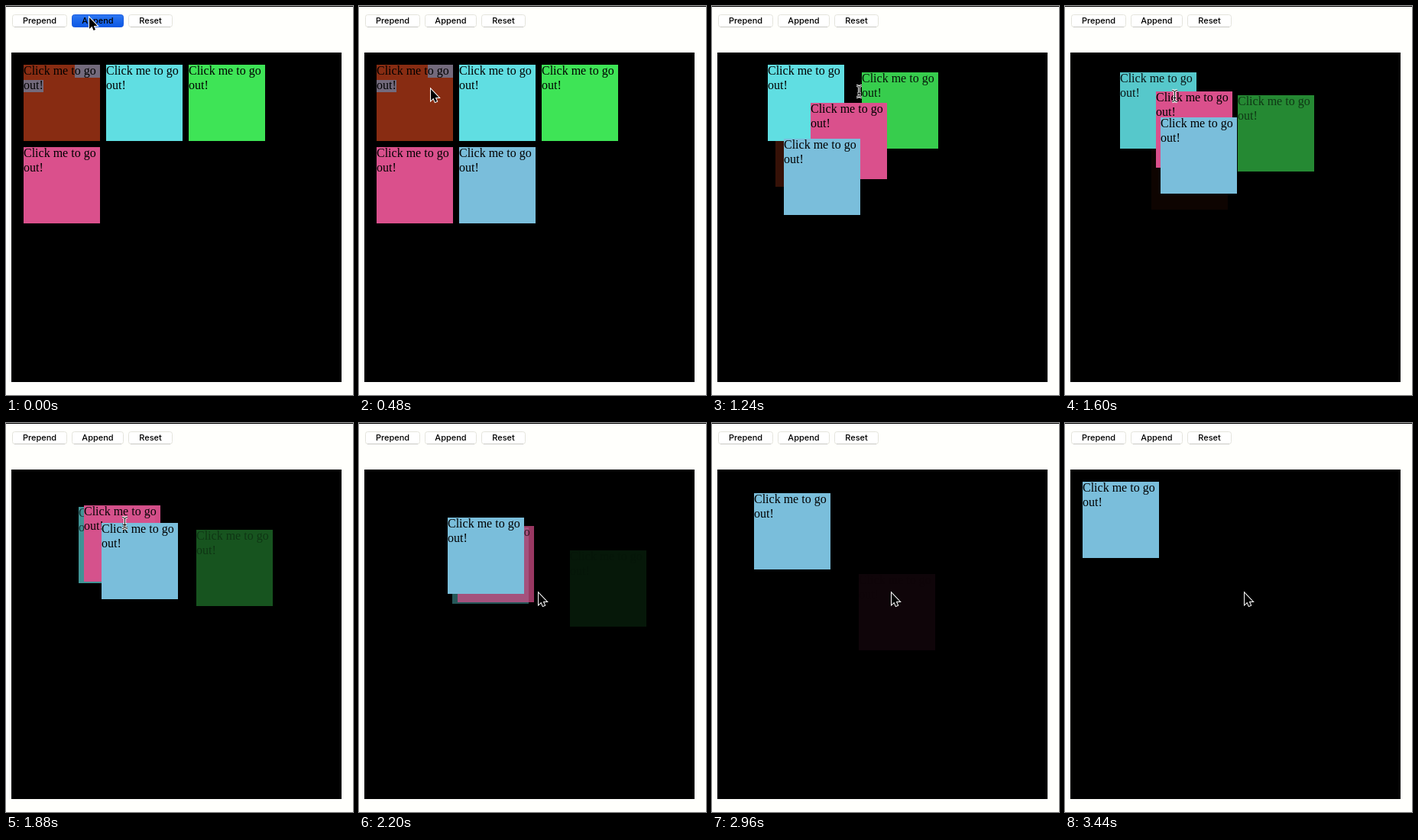
Recreate the animation shown at these times as an HTML page with a canvas. Size 454 by 510 pixels, loop 4080 ms.

```html
<!DOCTYPE html>
<html lang="en">
<head>
<meta charset="utf-8">
<title>Tile list</title>
<style>
  html, body { margin: 0; width: 100%; height: 100%; overflow: hidden; background: #fffffc; }
  canvas { display: block; }
</style>
</head>
<body>
<canvas id="stage" width="454" height="510"></canvas>
<script>
const ctx = document.getElementById('stage').getContext('2d');
const LOOP = 4080, STEP = 40, MOVE = 1200, SIZE = 100;
const COLORS = ['#882c12', '#60dee2', '#3ee456', '#da508c', '#7abedb'];
const CLICKS = [{ at: 520, tile: 0 }, { at: 1120, tile: 2 }, { at: 1480, tile: 1 }, { at: 1840, tile: 3 }];
const LAST_PATH = [[1840, 126.5, 131.5], [2200, 116, 124], [2600, 104, 115], [3200, 23, 77]];
const CURSOR_PATH = [
  [40, 109, 15], [360, 94, 109], [560, 94, 109], [840, 221, 109], [1120, 221, 109],
  [1440, 143, 118], [1840, 143, 118], [2160, 235, 223]
];

const clamp = v => Math.max(0, Math.min(1, v));
const mix = (a, b, k) => a + (b - a) * k;
const mixPoint = (a, b, k) => ({ x: mix(a.x, b.x, k), y: mix(a.y, b.y, k) });
const slot = i => ({ x: 23 + 108 * (i % 3), y: 77 + 108 * Math.floor(i / 3) });

function along(path, t) {
  let i = 1;
  while (i < path.length - 1 && t > path[i][0]) i++;
  const [t0, x0, y0] = path[i - 1], [t1, x1, y1] = path[i];
  return mixPoint({ x: x0, y: y0 }, { x: x1, y: y1 }, clamp((t - t0) / (t1 - t0)));
}

// Each removal restarts the remaining tiles from where they are now.
function tileState(id, t) {
  if (id === 4 && t < CLICKS[0].at) {
    const k = clamp((t - 30) / 370);
    return { x: 131, y: 185 + 50 * (1 - k), alpha: k };
  }
  if (id === 4 && t >= 1840) return { ...along(LAST_PATH, t), alpha: 1 };

  let from = slot(id), to = from, start = 0;
  const order = [0, 1, 2, 3, 4];
  for (const { at, tile } of CLICKS) {
    if (t < at) break;
    const now = mixPoint(from, to, clamp((at - 12 - start) / MOVE));
    if (tile === id) {
      const k = clamp((t - at) / MOVE);
      return { x: now.x + 100 * k, y: now.y + 100 * k, alpha: 1 - k };
    }
    order.splice(order.indexOf(tile), 1);
    from = now;
    to = slot(order.indexOf(id));
    start = at;
  }
  return { ...mixPoint(from, to, clamp((t - start) / MOVE)), alpha: 1 };
}

function drawTile(id, t) {
  const { x, y, alpha } = tileState(id, t);
  if (alpha <= 0) return;
  ctx.save();
  ctx.translate(Math.round(x), Math.round(y));
  ctx.globalAlpha = alpha;
  ctx.fillStyle = COLORS[id];
  ctx.fillRect(0, 0, SIZE, SIZE);
  if (id === 0 && t < CLICKS[0].at) {
    ctx.fillStyle = '#736a7c';
    ctx.fillRect(67, 0, 33, 17);
    ctx.fillRect(0, 20, 26, 16);
  }
  ctx.fillStyle = '#000';
  ctx.font = '16px "Liberation Serif", Times, serif';
  ctx.textAlign = 'left';
  ctx.fillText('Click me to go', 0, 13);
  ctx.fillText('out!', 0, 32);
  ctx.restore();
}

function drawButton(label, x, w, pressed) {
  ctx.beginPath();
  ctx.roundRect(x + 0.5, 11.5, w - 1, 16, 3);
  if (pressed) {
    const blue = ctx.createLinearGradient(0, 11, 0, 28);
    blue.addColorStop(0, '#2f78f2');
    blue.addColorStop(1, '#0a56e4');
    ctx.fillStyle = blue;
  } else {
    ctx.fillStyle = '#fff';
  }
  ctx.fill();
  ctx.lineWidth = 1;
  ctx.strokeStyle = pressed ? '#1a5ce0' : '#e4e4dc';
  ctx.stroke();
  if (!pressed) {
    ctx.fillStyle = '#c8c8c4';
    ctx.fillRect(x + 3, 27, w - 6, 1);
  }
  ctx.fillStyle = '#000';
  ctx.font = '500 11px Inter, sans-serif';
  ctx.textAlign = 'center';
  ctx.fillText(label, x + w / 2, 23);
}

function drawArrow() {
  const outline = [[0, 0], [0, 15], [3.4, 11.8], [5.6, 17], [8, 16], [5.8, 11], [10.5, 11]];
  ctx.beginPath();
  outline.forEach(([x, y]) => ctx.lineTo(x, y));
  ctx.closePath();
  ctx.lineWidth = 2;
  ctx.strokeStyle = '#fff';
  ctx.stroke();
  ctx.fillStyle = '#000';
  ctx.fill();
}

function drawBeam() {
  for (const [color, width] of [['#fff', 3], ['#000', 1]]) {
    ctx.beginPath();
    ctx.moveTo(-3, -7.5);
    ctx.quadraticCurveTo(0.5, -7.5, 0.5, -5);
    ctx.lineTo(0.5, 5);
    ctx.quadraticCurveTo(0.5, 7.5, -3, 7.5);
    ctx.moveTo(4, -7.5);
    ctx.quadraticCurveTo(0.5, -7.5, 0.5, -5);
    ctx.moveTo(0.5, 5);
    ctx.quadraticCurveTo(0.5, 7.5, 4, 7.5);
    ctx.moveTo(-1.5, 2.5);
    ctx.lineTo(2.5, 2.5);
    ctx.strokeStyle = color;
    ctx.lineWidth = width;
    ctx.stroke();
  }
}

function drawCursor(t) {
  const { x, y } = along(CURSOR_PATH, t);
  ctx.save();
  ctx.translate(Math.round(x), Math.round(y));
  if (t >= 800 && t < 1920) drawBeam();
  else drawArrow();
  ctx.restore();
}

function draw(t) {
  ctx.fillStyle = '#fffffc';
  ctx.fillRect(0, 0, 454, 510);
  ctx.fillStyle = '#000';
  ctx.fillRect(0, 0, 454, 1);
  ctx.fillRect(7, 61, 432, 432);
  drawButton('Prepend', 8, 72, false);
  drawButton('Append', 86, 68, t < 80);
  drawButton('Reset', 160, 58, false);
  COLORS.forEach((_, id) => drawTile(id, t));
  drawCursor(t);
}

const began = performance.now();
function tick() {
  const t = (performance.now() - began) % LOOP;
  draw(Math.floor(t / STEP) * STEP);
  requestAnimationFrame(tick);
}
tick();
</script>
</body>
</html>
```
